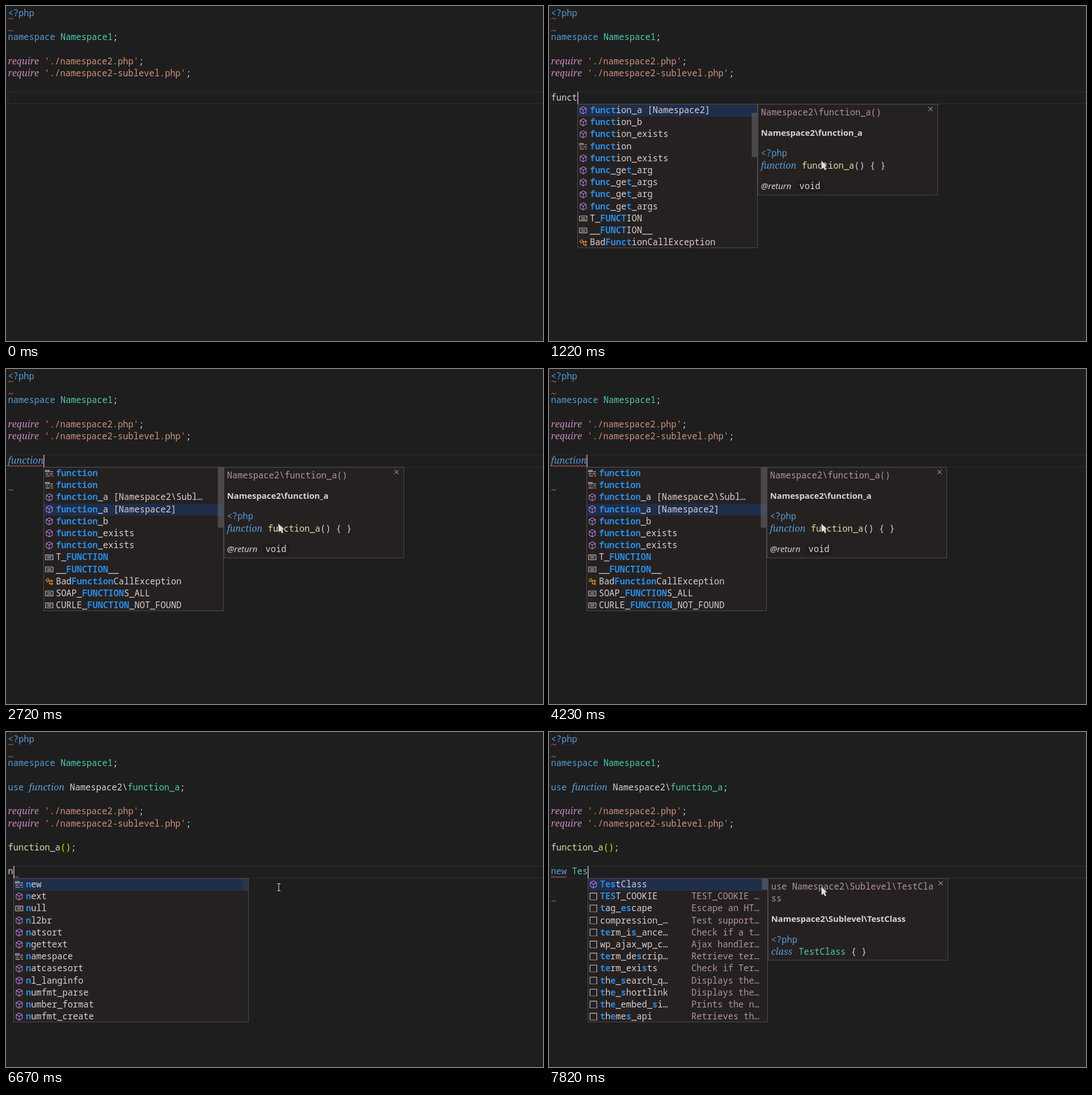
Recreate the animation shown at these times as an HTML page. Size 947x591 px, loop 8000 ms.

```html
<!DOCTYPE html>
<html lang="en">
<head>
<meta charset="utf-8">
<title>Editor completion</title>
<style>
  html, body { margin: 0; width: 100%; height: 100%; overflow: hidden; background: #1e1e1e; }
  svg { display: block; width: 947px; height: 591px; }
  text { font: 15.4px "Noto Sans Mono", "DejaVu Sans Mono", monospace; white-space: pre; fill: #d4d4d4; }
  .k, .K { fill: #569cd6; }
  .t { fill: #4ec9b0; }
  .s { fill: #ce9178; }
  .y { fill: #dcdcaa; }
  .g { fill: #ffd700; }
  .P { fill: #c586c0; }
  .K, .P { font: italic 16.3px "Noto Serif", serif; }
  .item { fill: #d8ced5; }
  .hit { font-weight: 700; fill: #2b8ae2; }
  .dim { fill: #b091aa; }
  .head { font: 700 14.85px "Noto Sans", sans-serif; }
  .tag { font: italic 14.85px "Noto Sans", sans-serif; }
  .panel { fill: #252120; stroke: #4d4a49; }
  .line { fill: none; stroke: #2b2b2b; stroke-width: 1.2; }
  .wave { fill: none; stroke: #e2695a; }
  .icon { fill: none; stroke-width: 1.1; stroke-linejoin: round; }
</style>
</head>
<body>
<svg id="stage" viewBox="0 0 947 591"></svg>
<script>
const LEFT = 3.5, CELL = 9.24, SCRIPT = 7.86, ROW = 21.23, LOOP = 8000;
const stage = document.getElementById('stage');
const middle = row => 12.9 + row * ROW;
const esc = s => s.replace(/&/g, '&amp;').replace(/</g, '&lt;');
const text = (x, mid, cls, s) => `<text x="${x}" y="${mid + 5}" class="${cls}">${s}</text>`;
const rect = (x, y, w, h, attrs) => `<rect x="${x}" y="${y}" width="${w}" height="${h}" ${attrs}/>`;

// Runs are written "class:text|class:text"; capital classes are script words.
const runs = src => src ? src.split('|').map(r => [r[0], r.slice(2)]) : [];
const runWidth = ([c, s]) => s.length * (/[A-Z]/.test(c) ? SCRIPT : CELL);
const width = src => runs(src).reduce((sum, r) => sum + runWidth(r), 0);
function code(x, mid, src) {
  return runs(src).map(r => {
    const out = text(x, mid, r[0], esc(r[1]));
    x += runWidth(r);
    return out;
  }).join('');
}

const icons = {
  m: ['#b180d7', 'M0-6.3L5.4-3.4V3.4L0 6.3-5.4 3.4V-3.4ZM-5.4-3.4L0-.5 5.4-3.4M0-.5V6.3'],
  k: ['#cfc3cb', 'M-6.5-5H0V-2.5H-6.5ZM2-2.5H6.5M-6.5 1.2H-1.5M.5 1.2H6.5M-6.5 4.8H1.5M3.5 4.8H6.5'],
  c: ['#cfc3cb', 'M-6.5-4.2H6.5V4.2H-6.5ZM-3.8-1.2H3.8M-3.8 1.4H3.8'],
  o: ['#ee9d28', 'M-6-1.5L-2.5-5 0-2.5-3.5 1ZM-1.5-1H2.5M.2-1V4.2H2.5M2.5-1L4.3-2.6 6-1 4.3.8ZM2.5 4.2L4.3 2.5 6 4.2 4.3 6Z'],
  s: ['#cfc3cb', 'M-6 6V-6H6V6M-5 6h1.5m1 0h1.5m1 0h1.5m1 0h1.5m1 0h1']
};

const lists = {
  funct: {
    bar: [14.5, 78],
    rows: ['m function_a [Namespace2]', 'm function_b', 'm function_exists', 'k function',
      'm function_exists', 'm func_get_arg', 'm func_get_args', 'm func_get_arg', 'm func_get_args',
      'c T_FUNCTION', 'c __FUNCTION__', 'o BadFunctionCallException']
  },
  full: {
    bar: [0, 106],
    rows: ['k function', 'k function', 'm function_a [Namespace2\\Sublevel]', 'm function_a [Namespace2]',
      'm function_b', 'm function_exists', 'm function_exists', 'c T_FUNCTION', 'c __FUNCTION__',
      'o BadFunctionCallException', 'c SOAP_FUNCTIONS_ALL', 'c CURLE_FUNCTION_NOT_FOUND']
  },
  n: {
    bar: [0, 21, .1],
    rows: ['k new', 'm next', 'c null', 'm nl2br', 'm natsort', 'm ngettext', 'k namespace',
      'm natcasesort', 'm nl_langinfo', 'm numfmt_parse', 'm number_format', 'm numfmt_create']
  },
  ne: {
    bar: [0, 40, .2],
    rows: ['k new', 'm next', 'm ngettext', 'k namespace', 'm natcasesort', 'm numfmt_parse',
      'm number_format', 'm numfmt_create', 'm net_get_interfaces', 'm numfmt_get_locale',
      'm numfmt_get_pattern', 'm numfmt_set_symbol']
  },
  tes: {
    bar: [0, 19],
    rows: ['m TestClass', 's TEST_COOKIE~TEST_COOKIE …', 's tag_escape~Escape an HT…',
      's compression_…~Test support…', 's term_is_ance…~Check if a t…', 's wp_ajax_wp_c…~Ajax handler…',
      's term_descrip…~Retrieve ter…', 's term_exists~Check if Ter…', 's the_search_q…~Displays the…',
      's the_shortlink~Displays the…', 's the_embed_si…~Prints the n…', 's themes_api~Retrieves th…']
  }
};

const funcDoc = (sig, name) => ({
  sig, name, body: 'K:function|w: |y:function_a|w:() { }', ret: true
});
const docs = {
  a: funcDoc(['Namespace2\\function_a()'], 'Namespace2\\function_a'),
  sub: funcDoc(['Namespace2\\Sublevel\\function_a(', ')'], 'Namespace2\\Sublevel\\function_a'),
  test: {
    sig: ['use Namespace2\\Sublevel\\TestCla', 'ss'], name: 'Namespace2\\Sublevel\\TestClass',
    body: 'K:class|w: |t:TestClass|w: { }'
  }
};

// Marks a whole match if there is one, else the letters in order.
function marked(label, query) {
  const low = label.toLowerCase(), hits = new Set(), at = low.indexOf(query);
  let pos = -1;
  for (let i = 0; i < query.length; i++) {
    pos = at >= 0 ? at + i : low.indexOf(query[i], pos + 1);
    if (pos < 0) return esc(label);
    hits.add(pos);
  }
  return [...label].map((c, i) => hits.has(i) ? `<tspan class="hit">${esc(c)}</tspan>` : esc(c)).join('')
    .replace(/<\/tspan><tspan class="hit">/g, '');
}

function popup(s, x, top) {
  const { rows, bar } = lists[s.list], w = s.doc ? 317 : 414, max = Math.floor((w - 55) / CELL);
  let out = rect(x, top, w, 253, 'class="panel"');
  out += rect(x + .5, top + .5 + s.sel * 21.2, w - 1, 21, 'fill="#1f2e49"');
  rows.forEach((row, i) => {
    const mid = top + 10.4 + i * 21.2, [color, path] = icons[row[0]];
    let [label, detail] = row.slice(2).split('~');
    if (label.length > max) label = label.slice(0, max - 1) + '…';
    out += `<path class="icon" stroke="${color}" transform="translate(${x + 9.8} ${mid})" d="${path}"/>`;
    out += text(x + 21.4, mid, 'item', marked(label, s.query));
    if (detail) out += text(x + 182.5, mid, 'dim', detail);
  });
  out += rect(x + w - 10, top + .5 + bar[0], 9.5, bar[1], `fill="#797979" opacity="${bar[2] || .45}"`);
  return s.doc ? out + docPanel(docs[s.doc], x + w + 1, top) : out;
}

function docPanel(d, x, top) {
  const tx = x + 5.2, title = top + 50.4 + (d.sig.length - 1) * 21.2, body = title + 57.7;
  const bottom = Math.round(body + (d.ret ? 51.5 : 14)) + .5;
  let out = rect(x, top, 317, bottom - top, 'class="panel"');
  d.sig.forEach((s, i) => out += text(tx, top + 14.4 + i * 21.2, 'dim', s));
  out += text(tx, title, 'head', d.name) + code(tx, title + 36.5, 'k:<?php') + code(tx, body, d.body);
  if (d.ret) {
    out += rect(x + 68, body + 26.5, 47, 20, 'rx="2" fill="#1f1c1c"');
    out += text(tx, body + 36.5, 'tag', '@return') + text(x + 73, body + 36.5, '', 'void');
  }
  return out + `<path d="M${x + 300.5} ${top + 4.5}l7.5 7.5m0-7.5l-7.5 7.5" stroke="#cfc3cb"/>`;
}

function wave([from, to, row]) {
  let d = `M${from} ${middle(row) + 10.3}`;
  for (let x = from, up = true; x + 3 <= to + .5; x += 3, up = !up) d += `q1.5 ${up ? -1 : 1} 3 ${up ? -2 : 2}`;
  return `<path class="wave" d="${d}"/>`;
}

function pointer(s) {
  if (s.doc) return '<path d="M480 272.5L490.3 282.6 486.8 283.6 489 288.6 486.4 290 484.2 285.5 480.5 288Z" fill="#dedede" stroke="#333" stroke-width=".5"/>';
  return s.list ? '<path d="M478 267.5h2.3l.8.7.8-.7h2.3M481.1 268v11.5M478 280h2.3l.8-.7.8.7h2.3" fill="none" stroke="#d4d4d4" stroke-width="1.1"/>' : '';
}

function draw(s) {
  const mid = middle(s.row), top = Math.round(mid + 11.3) + .5, shift = s.imported ? 2 : 0;
  const x = Math.round(LEFT + width(s.edit) - (s.back || 0) * CELL) + .5;
  let out = rect(LEFT, top - 22, 960, 21, 'class="line"');
  const put = (row, src) => out += code(LEFT, middle(row), src);
  put(0, 'k:<?php');
  put(2, 'k:namespace|w: |t:Namespace1|w:;');
  if (s.imported) put(4, 'k:use|w: |K:function|w: Namespace2\\|t:function_a|w:;');
  put(4 + shift, "P:require|w: |s:'./namespace2.php'|w:;");
  put(5 + shift, "P:require|w: |s:'./namespace2-sublevel.php'|w:;");
  if (s.done) put(9, s.done);
  put(s.row, s.edit);
  out += [[4, 13, 0], [4, 13, 1], ...s.waves].map(wave).join('');
  if (s.list) out += popup(s, x, top);
  if (s.caret) out += rect(x - .5, top - 22, 1.7, 21.5, 'fill="#c795bf"');
  stage.innerHTML = out + pointer(s);
}

const word = edit => ({ edit: 'w:' + edit, query: edit });
const off = { caret: false }, on = { caret: true };
const call = 'y:function_a|g:()';
const after = [[4, 31, 11], [4, 13, 13]];
// Each step changes only the named parts of the one before.
const steps = [
  [0, { row: 7, edit: '', waves: [], caret: false, sel: 0, list: '', doc: '', query: '' }],
  [50, on],
  [540, off],
  [700, { ...on, ...word('f') }],
  [768, word('fu')],
  [836, { list: 'funct' }],
  [904, word('fun')],
  [972, word('func')],
  [1040, { doc: 'a' }],
  [1220, word('funct')],
  [1260, word('functio')],
  [1300, word('function')],
  [1580, { edit: 'K:function', waves: [[4, 66, 7], [4, 13, 9]] }],
  [1670, { list: 'full', doc: '' }],
  [1890, off],
  [2100, { sel: 1 }],
  [2230, { sel: 2 }],
  [2300, on],
  [2370, { doc: 'sub' }],
  [2720, { sel: 3, doc: 'a' }],
  [3070, off],
  [3330, { ...on, sel: 2 }],
  [3410, { doc: 'sub' }],
  [3730, off],
  [4230, { ...on, sel: 3, doc: 'a' }],
  [4470, { edit: 'w:function_a', list: '', doc: '', sel: 0, waves: [] }],
  [4520, { edit: 'y:function_a', imported: true, row: 9 }],
  [4700, { edit: call, back: 1 }],
  [4790, { back: 0 }],
  [4970, off],
  [5420, { ...on, edit: call + '|w:;' }],
  [5830, { edit: '', done: call + '|w:;', row: 10 }],
  [6240, { row: 11, waves: [[4, 13, 12]] }],
  [6500, { ...word('n'), waves: [] }],
  [6560, { list: 'n' }],
  [6625, { waves: [[13.5, 22.5, 11]] }],
  [6900, { ...word('ne'), list: 'ne' }],
  [7160, { edit: 'k:new', list: '', waves: after }],
  [7230, { edit: 'k:new|w: ' }],
  [7300, { edit: 'k:new|w: |t:T', query: 't' }],
  [7370, { list: 'tes', doc: 'test' }],
  [7560, { edit: 'k:new|w: |t:Te', query: 'te' }],
  [7820, { edit: 'k:new|w: |t:Tes', query: 'tes' }]
];
let state = {};
const scenes = steps.map(([at, change]) => [at, state = { ...state, ...change }]);

let shown;
function tick() {
  const t = performance.now() % LOOP;
  const now = scenes.findLast(([at]) => at <= t)[1];
  if (now !== shown) draw(shown = now);
  requestAnimationFrame(tick);
}
tick();
</script>
</body>
</html>
```
